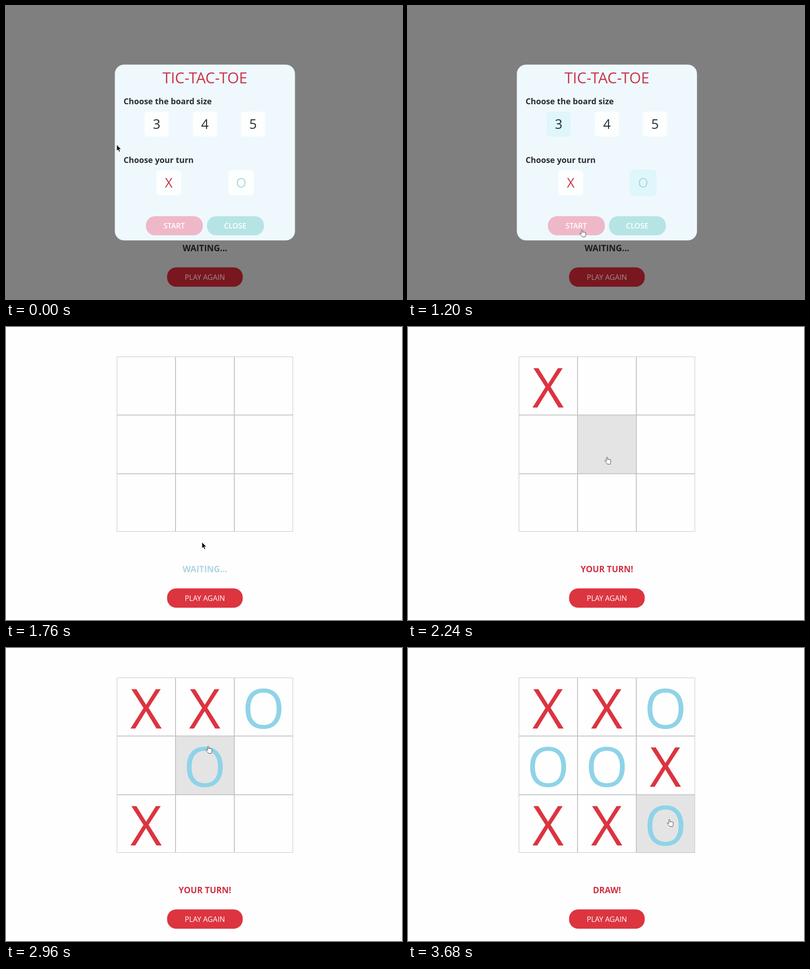
Recreate the animation shown at these times as an HTML page. Size 869x644 px, loop 3760 ms.

```html
<!DOCTYPE html>
<html lang="en">
<head>
<meta charset="utf-8">
<title>Tic-tac-toe</title>
<style>
  html, body { margin: 0; width: 100%; height: 100%; overflow: hidden; background: #fefefe; }
  svg { display: block; width: 869px; height: 644px; font-family: "Open Sans", "Noto Sans", sans-serif; }
  text { text-anchor: middle; }
  .left { text-anchor: start; font-size: 17.8px; font-weight: 700; fill: #2a2b33; }
  .tile rect { fill: #fdfefe; }
  .tile.on rect { fill: #dff6fa; }
  .tile text { font-size: 29px; fill: #2a2b33; }
  .pill { font-size: 16px; font-weight: 600; fill: #fff; }
  .red { fill: #dc3440; }
  .blue { fill: #8fd3e8; }
  #status { font-size: 18.7px; font-weight: 700; }
  #board text { font-size: 120px; }
  #board path { fill: none; stroke: #c5c5c5; }
  #again rect { fill: #dc3540; }
  #again text { font-size: 16px; fill: #fff; }
  .dim #page { fill: #7f7f7f; }
  .dim #again rect { fill: #78171f; }
  .dim #again text { fill: #a08c8f; }
  .dim #board, svg:not(.dim) #modal { display: none; }
</style>
</head>
<body>
<svg id="stage" viewBox="0 0 869 644">
  <rect id="page" width="869" height="644" fill="#fefefe"/>
  <g id="board">
    <rect id="hover" width="128" height="128" fill="#e4e4e4"/>
    <path d="M243.5 65.5H629.5V449.5H243.5Z"/>
    <path stroke-width="2" d="M372 65V450M501 65V450M243 193.5H630M243 322.5H630"/>
    <g id="marks"></g>
  </g>
  <text id="status" x="436.5" y="539"></text>
  <g id="again">
    <rect x="353.5" y="574.5" width="166" height="42.5" rx="20"/>
    <text x="436.5" y="601.5">PLAY AGAIN</text>
  </g>
  <g id="modal">
    <rect x="239" y="129" width="395" height="386" rx="20" fill="#eff9fd" stroke="#d5dde0" stroke-width=".6"/>
    <text x="436.5" y="169.5" font-size="33.2" fill="#cb3449">TIC-TAC-TOE</text>
    <text class="left" x="258" y="215.5">Choose the board size</text>
    <text class="left" x="258" y="344.5">Choose your turn</text>
    <g id="tiles"></g>
    <rect x="307" y="462" width="125" height="42" rx="20" fill="#efb8c8"/>
    <text class="pill" x="369" y="489">START</text>
    <rect x="441" y="462" width="125" height="42" rx="20" fill="#b6e4e4"/>
    <text class="pill" x="503" y="489">CLOSE</text>
  </g>
  <g id="cursor">
    <path id="arrow" d="M0 0V13.6L3.1 10.8L5.2 15.6L7.5 14.6L5.4 9.9H9.6Z" fill="#111" stroke="#fff" stroke-width=".7"/>
    <path id="hand" transform="translate(-5.2 0)" fill="#fff" stroke="#4a4448" stroke-linejoin="round"
      d="M4.5 10V2.2a1.3 1.3 0 0 1 2.6 0V6.5a1.2 1.2 0 0 1 2.4.3a1.2 1.2 0 0 1 2.4.4a1.1 1.1 0 0 1 2.2.6V12c0 2-1 2.5-1 4.5H6.5C6 14.5 2.5 12 1.2 9.8C.6 8.4 2.2 7.8 3 8.7L4.5 10Z"/>
  </g>
</svg>
<script>
const LOOP = 3760, STEP = 80, START = 1280;
const RED = '#d03344', BLUE = '#8fd3e8';
const $ = id => document.getElementById(id);

function add(parent, tag, attrs, text = '') {
  const node = document.createElementNS('http://www.w3.org/2000/svg', tag);
  for (const key in attrs) node.setAttribute(key, attrs[key]);
  node.textContent = text;
  return parent.appendChild(node);
}

// Tiles: label, left, top, width, colour
const tiles = [
  ['3', 304, 232, 53], ['4', 410, 232, 53], ['5', 515.5, 232, 53],
  ['X', 329.5, 361, 55, '#cc3545'], ['O', 488, 361, 56, '#add9dc']
].map(([label, x, y, w, color]) => {
  const node = add($('tiles'), 'g', { class: 'tile' });
  const ring = add(node, 'rect', { x: x - 1.5, y: y - 1.5, width: w + 3, height: 58, rx: 10 });
  add(node, 'rect', { x, y, width: w, height: 55, rx: 8 });
  const text = add(node, 'text', { x: x + w / 2, y: y + 37.5 }, label);
  if (color) text.style.fill = color;
  return { node, ring, x, y, w, h: 55 };
});
const targets = [...tiles, { x: 307, y: 462, w: 125, h: 42 }, { x: 441, y: 462, w: 125, h: 42 }];

const cells = [...Array(9).keys()].map(i =>
  ({ x: 243.5 + i % 3 * 129, y: 65.5 + Math.floor(i / 3) * 128.7, w: 129, h: 128.7 }));

// Moves: time, cell, mark
const marks = [
  [2080, 0, 'X'], [2400, 4, 'O'], [2560, 1, 'X'], [2720, 2, 'O'], [2960, 6, 'X'],
  [3200, 3, 'O'], [3360, 5, 'X'], [3600, 8, 'O'], [3680, 7, 'X']
].map(([time, cell, mark]) => ({
  time, mark,
  node: add($('marks'), 'text', {
    x: 307.5 + cell % 3 * 128.7,
    y: 176.5 + Math.floor(cell / 3) * 128.5,
    class: mark === 'X' ? 'red' : 'blue'
  }, mark)
}));

// Pointer: time, x, y
const path = [
  [0, 243, 305], [320, 335, 268], [480, 335, 268], [720, 537, 386], [880, 537, 386],
  [1200, 381, 491], [1360, 381, 491], [1760, 430, 473], [2079, 430, 473], [2080, 432, 420],
  [2240, 436, 285], [2400, 436, 285], [2640, 541, 177], [2720, 541, 177],
  [3200, 345, 253], [3280, 345, 253], [3600, 573, 376], [LOOP, 573, 376]
];

function pointerAt(t) {
  const i = path.findIndex(key => key[0] > t);
  const [t0, x0, y0] = path[i - 1], [t1, x1, y1] = path[i];
  const k = (t - t0) / (t1 - t0), ease = k * k * (3 - 2 * k);
  return [x0 + (x1 - x0) * ease, y0 + (y1 - y0) * ease];
}

function statusAt(t) {
  if (t < START) return ['WAITING...', '#1a1c1e'];
  const last = marks.filter(m => m.time <= t).pop();
  if (!last) return ['WAITING...', '#afd6e2'];
  if (last === marks[8]) return ['DRAW!', RED];
  return last.mark === 'X' ? ['YOUR TURN!', RED] : ['WAITING...', BLUE];
}

function setTile(tile, on, focus) {
  tile.node.classList.toggle('on', on);
  tile.ring.style.fill = focus ? '' : 'none';
  tile.ring.style.stroke = focus === 'ring' ? '#bbd6f2' : 'none';
  tile.ring.style.strokeWidth = 4;
}

function draw(t) {
  const inModal = t < START;
  $('stage').classList.toggle('dim', inModal);

  const [label, color] = statusAt(t);
  $('status').textContent = label;
  $('status').style.fill = color;

  for (const m of marks) m.node.style.display = t >= m.time ? '' : 'none';
  tiles.forEach(tile => setTile(tile, false, ''));
  setTile(tiles[0], t >= 400, t >= 400 && t < 800 ? 'ring' : '');
  setTile(tiles[4], t >= 800, t < 800 ? '' : t < 1200 ? 'ring' : 'soft');

  const [x, y] = pointerAt(t);
  const hit = (inModal ? targets : cells).find(r =>
    x >= r.x && x < r.x + r.w && y >= r.y && y < r.y + r.h);
  $('cursor').setAttribute('transform', `translate(${x} ${y})`);
  $('hand').style.display = hit ? '' : 'none';
  $('arrow').style.display = hit ? 'none' : '';
  $('hover').style.display = hit ? '' : 'none';
  if (hit) {
    $('hover').setAttribute('x', hit.x);
    $('hover').setAttribute('y', hit.y);
  }
}

const began = performance.now();
function tick() {
  const t = (performance.now() - began) % LOOP;
  draw(Math.floor(t / STEP) * STEP);
  requestAnimationFrame(tick);
}
tick();
</script>
</body>
</html>
```
